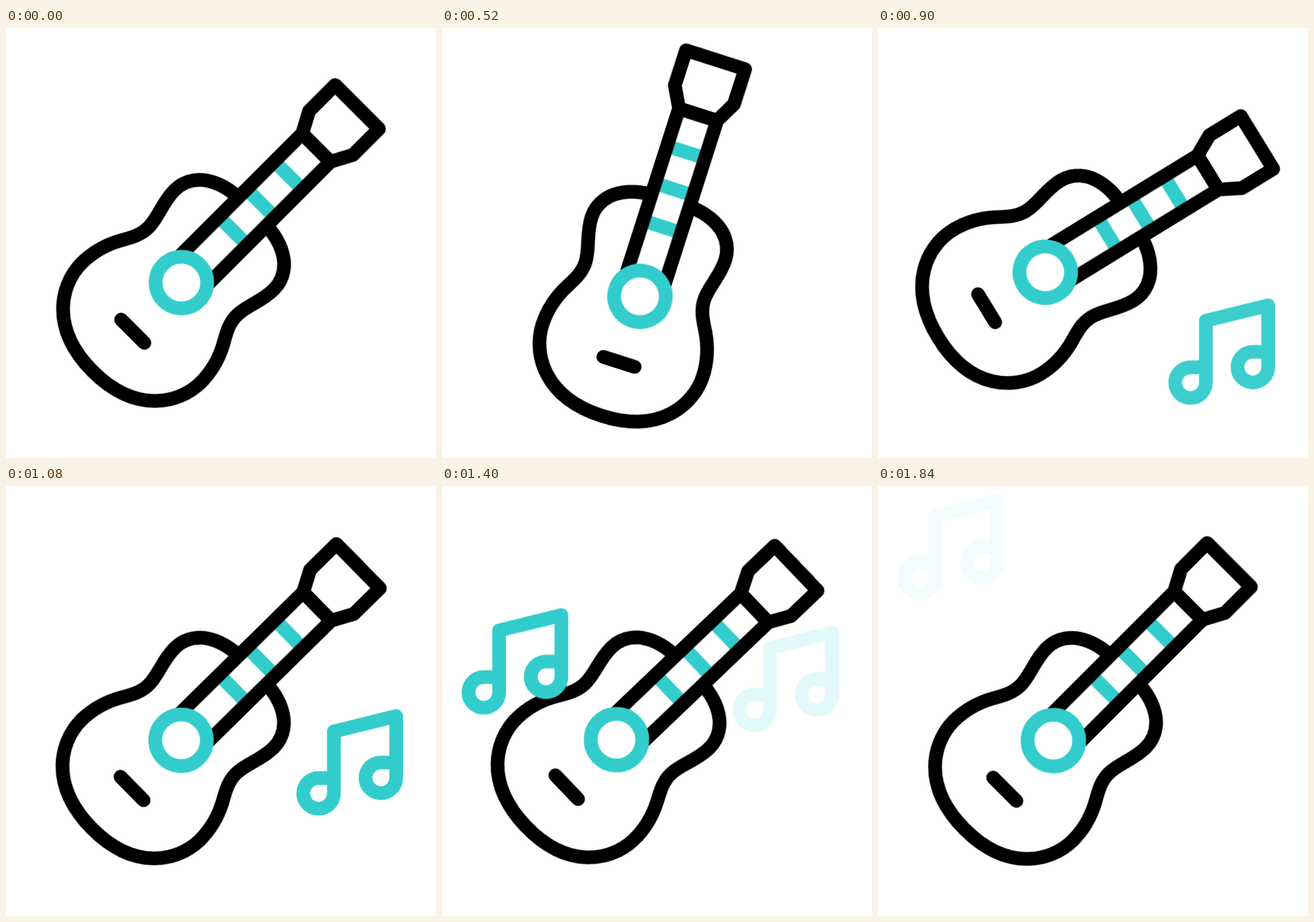
An HTML page without scripts that plays this animation: 640x640 px, repeating every 2400 ms.

```html
<!DOCTYPE html>
<html lang="en">
<head>
<meta charset="utf-8">
<title>Swinging guitar</title>
<style>
  html, body { margin: 0; width: 100%; height: 100%; overflow: hidden; background: #fff; }
  svg { display: block; width: 100vw; height: 100vh; }

  .ink, .teal { fill: none; stroke-width: 20.4; stroke-linejoin: round; }
  .ink { stroke: #000; }
  .teal { stroke: #3cc; }
  .round { stroke-linecap: round; }

  .guitar, .note { animation: 2400ms linear infinite; }

  .guitar {
    transform-origin: 320px 320px;
    animation-name: swing;
    animation-timing-function: cubic-bezier(.333, 0, .667, 1);
  }
  /* damped swing that settles at 1840 ms and rests */
  @keyframes swing {
    0% { transform: rotate(0deg); }
    26.667% { transform: rotate(-30deg); animation-timing-function: cubic-bezier(.266, 0, .68, 1); }
    38.333% { transform: rotate(14.1deg); }
    49.583% { transform: rotate(-7.1deg); }
    60.417% { transform: rotate(2.2deg); }
    76.667%, 100% { transform: rotate(0deg); }
  }

  .note { animation-timing-function: cubic-bezier(.333, 0, .667, 1), linear; }
  .right { animation-name: rise-right, fade-right; }
  .left { animation-name: rise-left, fade-left; }

  @keyframes rise-right {
    0%, 34.083% { transform: translate(0, 9.5px); }
    59.792%, 100% { transform: translate(0, -197px); }
  }
  @keyframes fade-right {
    0%, 33.958% { opacity: 0; }
    37.708%, 49.417% { opacity: 1; }
    59.708%, 100% { opacity: 0; }
  }
  @keyframes rise-left {
    0%, 51.542% { transform: translate(-403px, -185.5px); }
    77.292%, 100% { transform: translate(-403px, -392px); }
  }
  @keyframes fade-left {
    0%, 51.542% { opacity: 0; }
    55.292%, 67% { opacity: 1; }
    76.667%, 100% { opacity: .06; }
  }
</style>
</head>
<body>
<svg viewBox="0 0 640 640">
  <defs>
    <path id="half" d="M0 270C38 270 72 260.5 97 235.5C114.5 218 125.5 193 125.5 168
      C125.5 143 118 120.4 108 102.5C100 88.2 92.7 76 92.7 60C92.7 38 104.5 20 104.5 -7
      C104.5 -21.5 98.2 -34.7 88.4 -44.5C74 -57.8 54 -64.6 31 -66.2"/>
    <path id="note" d="M488 505.8H465.2a22.8 22.8 0 1 0 22.8 22.8V436.3L580.7 413.5V505.4
      a22.8 22.8 0 1 1 -22.8 -22.8h22.8"/>
  </defs>

  <g class="guitar">
    <!-- drawn upright around its pivot, then tilted -->
    <g transform="translate(320 320) rotate(45)">
      <g class="ink round">
        <use href="#half"/>
        <use href="#half" transform="scale(-1 1)"/>
        <path d="M-24.5 185.8H24.5"/>
      </g>
      <path class="teal" d="M-21 -142H21M-21 -83.8H21M-21 -25.5H21"/>
      <path class="ink" d="M-29.7 58V-200.8H29.7V58"/>
      <path class="ink" d="M-29.7 -200.8L-46.2 -231.6V-286.4H46.2V-231.6L29.7 -200.8Z"/>
      <circle class="teal" cy="83.4" r="38.4"/>
    </g>
  </g>

  <g class="teal">
    <g class="note right"><use href="#note"/></g>
    <g class="note left"><use href="#note"/></g>
  </g>
</svg>
</body>
</html>
```
